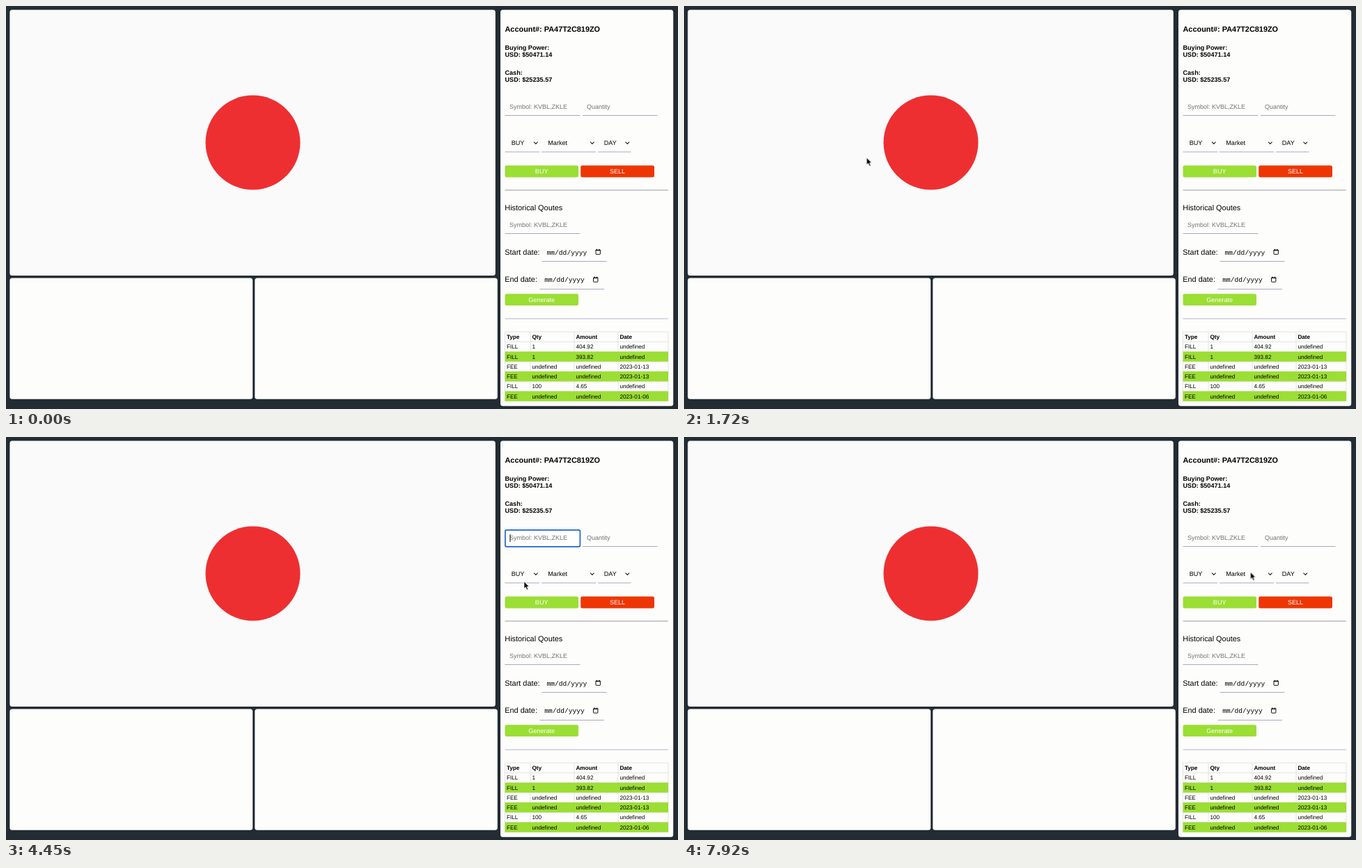
These frames come from a looping animation (965x580 px, 8 s). An HTML page:

```html
<!DOCTYPE html>
<html lang="en">
<head>
<meta charset="utf-8">
<title>Trading dashboard</title>
<style>
  html, body { margin: 0; width: 100%; height: 100%; overflow: hidden; background: #222c32; }
  svg { display: block; width: 965px; height: 580px; }
  text { font: 9.1px "Liberation Sans", Arial, sans-serif; fill: #000; text-rendering: geometricPrecision; white-space: pre; }
  .panel { fill: #fdfdfc; }
  .main { fill: #fafafb; }
  .big { font-size: 10.9px; }
  .bold { font-weight: 700; }
  .hint { font-size: 9px; fill: #727272; }
  .date { font: 9.6px "Liberation Mono", monospace; }
  .btn { fill: #fff; text-anchor: middle; }
  .cell { font-size: 8.2px; }
  .buy { fill: #9bde34; }
  .sell { fill: #ee3603; }
  .line { fill: none; stroke: #aaa8bd; }
  .chevron { fill: none; stroke: #222; stroke-width: 1.1; }
  .grid { fill: none; stroke: #dcdcdc; stroke-width: .8; }

  .focus, .caret, .pointer, .arrow, .beam { animation: 8s infinite; }
  .focus { animation-name: focus; animation-timing-function: step-end; }
  .caret { animation-name: caret; animation-timing-function: step-end; }
  .arrow { animation-name: arrow; animation-timing-function: step-end; }
  .beam { animation-name: beam; animation-timing-function: step-end; }
  .pointer { animation-name: move; animation-timing-function: ease-in-out; }

  @keyframes focus {
    0%, 61%, 100% { opacity: 0; }
    38.875% { opacity: 1; }
  }
  @keyframes caret {
    0%, 45%, 57.6%, 100% { opacity: 0; }
    38.875%, 51.375% { opacity: 1; }
  }
  @keyframes arrow {
    0%, 34.3%, 100% { opacity: 0; }
    12.875%, 47% { opacity: 1; }
  }
  @keyframes beam {
    0%, 47%, 100% { opacity: 0; }
    34.3% { opacity: 1; }
  }
  @keyframes move {
    0%, 12.875% { transform: translate(0px, 214px); animation-timing-function: linear; }
    18.875% { transform: translate(196.5px, 216.5px); animation-timing-function: linear; }
    22.625% { transform: translate(290px, 219px); animation-timing-function: ease-out; }
    25.75%, 28.375% { transform: translate(308px, 219px); }
    36.625%, 45% { transform: translate(777px, 147px); }
    51.375%, 55.625% { transform: translate(744px, 208px); }
    58.875%, 76% { transform: translate(740px, 201px); }
    77.625%, 80.375% { transform: translate(742px, 200px); }
    82.75%, 84.75% { transform: translate(811px, 195px); }
    86%, 100% { transform: translate(813.5px, 194.5px); }
  }
</style>
</head>
<body>
<svg viewBox="0 0 965 580">
  <rect class="panel main" x="5.4" y="5.4" width="697.4" height="382.6" rx="3.5"/>
  <rect class="panel" x="5.4" y="391.4" width="348.8" height="174.4" rx="3.5"/>
  <rect class="panel" x="357.3" y="391.4" width="348.5" height="174.4" rx="3.5"/>
  <rect class="panel" x="710" y="5.4" width="248.2" height="570.4" rx="3.5"/>
  <circle cx="354.5" cy="196.5" r="68" fill="#ee2f31"/>

  <text class="big bold" x="716.5" y="36.8">Account#: PA47T2C819ZO</text>
  <text class="bold" x="716.5" y="62.6">Buying Power:</text>
  <text class="bold" x="716.5" y="73.2">USD: $50471.14</text>
  <text class="bold" x="716.5" y="98.6">Cash:</text>
  <text class="bold" x="716.5" y="109.2">USD: $25235.57</text>

  <path class="line" d="M716.5 157.5H824.5M828 157.5H935.5M716.5 210H766M769 210H847M850 210H897.5M716.5 327.5H824.5M769.5 367.5H862.5M766.5 407.5H859"/>
  <path class="line" d="M716.5 265H951" style="stroke:#999"/>
  <path class="line" d="M716.5 450H951" style="stroke:#b7b3d0"/>

  <rect class="focus" x="716.9" y="133.8" width="107.5" height="24" rx="2" fill="#fff" stroke="#2065cf" stroke-width="1.7"/>
  <text class="hint" x="723" y="148.4">Symbol: KVBL,ZKLE</text>
  <text class="hint" x="834" y="148.4">Quantity</text>
  <path class="caret" d="M724 140V151" stroke="#111"/>

  <text x="725.7" y="200">BUY</text>
  <text x="778.3" y="200">Market</text>
  <text x="858.8" y="200">DAY</text>
  <path class="chevron" d="M758 195.7l2.8 2.8l2.8-2.8M839 195.7l2.8 2.8l2.8-2.8M889.5 195.7l2.8 2.8l2.8-2.8"/>

  <rect class="buy" x="716.5" y="229.4" width="105.5" height="17" rx="2.5"/>
  <rect class="sell" x="825.2" y="229.4" width="105.8" height="17" rx="2.5"/>
  <text class="btn" x="769.2" y="241.2">BUY</text>
  <text class="btn" x="878" y="241.2">SELL</text>

  <text class="big" x="716.3" y="293.7">Historical Qoutes</text>
  <text class="hint" x="723" y="318.4">Symbol: KVBL,ZKLE</text>
  <text class="big" x="716.3" y="357.6">Start date:</text>
  <text class="date" x="776.6" y="357.6">mm/dd/yyyy</text>
  <text class="big" x="716.3" y="397.4">End date:</text>
  <text class="date" x="773.2" y="397.4">mm/dd/yyyy</text>
  <g id="icon">
    <rect x="847" y="351.2" width="6.4" height="6.2" rx=".6" fill="none" stroke="#111"/>
    <path d="M846.6 351.7H853.8M848.3 349.8V352M852.1 349.8V352" stroke="#111" stroke-width="1.2"/>
  </g>
  <use href="#icon" x="-3.5" y="39.8"/>

  <rect class="buy" x="716.5" y="414.3" width="105.5" height="16.8" rx="2.5"/>
  <text class="btn" x="769.2" y="426">Generate</text>

  <g id="table"></g>

  <g class="pointer">
    <path class="arrow" d="M0 0V10.2L2.3 8.1L4 12L5.8 11.2L4.1 7.5H7.2Z" fill="#000" stroke="#fff" stroke-width=".7"/>
    <path class="beam" d="M-2 -5.5Q0 -5.5 0 -4V4Q0 5.5 -2 5.5M2 -5.5Q0 -5.5 0 -4M0 4Q0 5.5 2 5.5M-1.3 1.8H1.3" fill="none" stroke="#111"/>
  </g>
</svg>
<script>
  const rows = [
    ["Type", "Qty", "Amount", "Date"],
    ["FILL", "1", "404.92", "undefined"],
    ["FILL", "1", "393.82", "undefined"],
    ["FEE", "undefined", "undefined", "2023-01-13"],
    ["FEE", "undefined", "undefined", "2023-01-13"],
    ["FILL", "100", "4.65", "undefined"],
    ["FEE", "undefined", "undefined", "2023-01-06"]
  ];
  const edges = [716.5, 753, 816, 879, 951];
  const tableTop = 469, rowH = 14.25;
  const bottom = tableTop + rows.length * rowH;
  let fills = "", labels = "", grid = "";

  rows.forEach((row, i) => {
    const y = tableTop + i * rowH;
    if (i && i % 2 === 0) fills += `<rect class="buy" x="716.5" y="${y}" width="234.5" height="${rowH}"/>`;
    grid += `M716.5 ${y}H951`;
    row.forEach((label, j) => {
      labels += `<text class="cell${i ? "" : " bold"}" x="${edges[j] + 2.4}" y="${y + 10}">${label}</text>`;
    });
  });
  grid += `M716.5 ${bottom}H951` + edges.map(x => `M${x} ${tableTop}V${bottom}`).join("");
  document.getElementById("table").innerHTML = `<path class="grid" d="${grid}"/>${fills}${labels}`;
</script>
</body>
</html>
```
